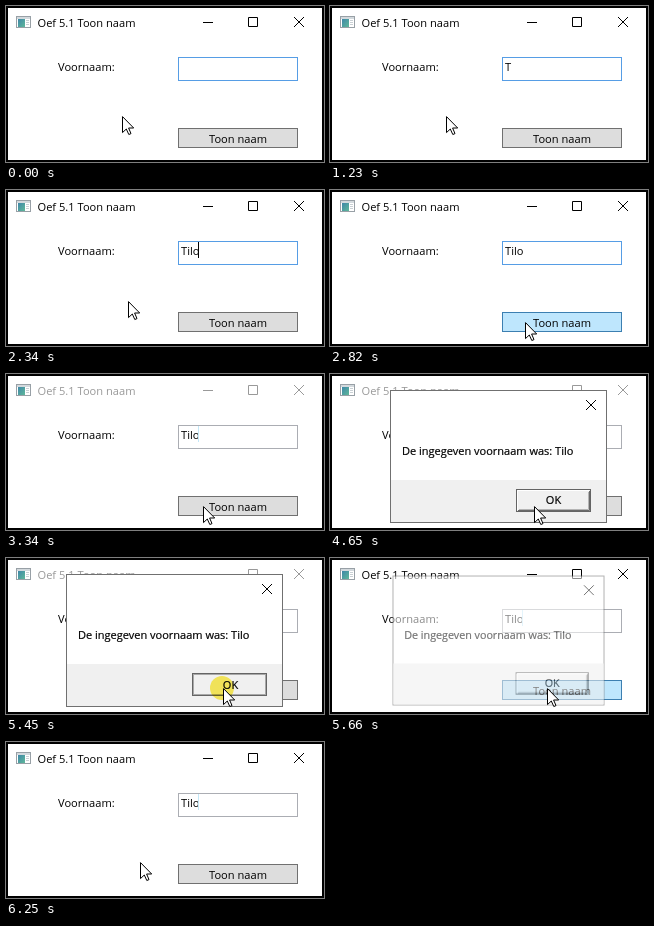
Recreate the animation shown at these times as an HTML page. Size 318x156 px, loop 7.82 s.

```html
<!DOCTYPE html>
<html lang="nl">
<head>
<meta charset="utf-8">
<title>Toon naam</title>
<style>
  html, body { margin: 0; width: 100%; height: 100%; overflow: hidden; background: #000; }
  svg { display: block; width: 100vw; height: 100vh; }
  text { font: 11.1px "Open Sans", "Noto Sans", sans-serif; fill: #000; }
  .line { fill: none; stroke: #000; }
  .inactive text { fill: #999; }
  .inactive .line { stroke: #999; }
  #field { fill: #fff; stroke: #abadb3; }
  #field.focus { stroke: #569de5; }
  #button { fill: #ddd; stroke: #707070; }
  #button.hover { fill: #bee6fd; stroke: #3c7fb1; }
  #button.pressed { fill: #c4e5f6; stroke: #2c628b; }
  #caret.on { fill: #000; }
  #caret.ghost { fill: #c4e8f8; }
  #caret.off { fill: none; }
  #dialog text { font-size: 11px; stroke: #000; stroke-width: .2px; }
  #halo { fill: #fff04c; mix-blend-mode: multiply; opacity: .9; }
</style>
</head>
<body>
<svg viewBox="0 0 318 156">
  <defs>
    <linearGradient id="teal" x2="1" y2="1">
      <stop stop-color="#3f87a8"/><stop offset="1" stop-color="#5fb89a"/>
    </linearGradient>
  </defs>
  <rect width="318" height="156"/>
  <rect x="2" y="2" width="314" height="152" fill="#fff"/>

  <g id="titlebar">
    <rect x="10.5" y="10.5" width="14" height="11" fill="#fff" stroke="#98a0a6"/>
    <rect x="11" y="11" width="13" height="2" fill="#d3d9dd"/>
    <rect x="12" y="13" width="7" height="8" fill="url(#teal)"/>
    <path d="M20 14.5h3M20 16.5h3M20 18.5h3" stroke="#c9d0d4"/>
    <text x="31.5" y="20.5">Oef 5.1 Toon naam</text>
    <path class="line" d="M197 16.5h10M242.5 11.5h9v9h-9zM288 11l10 10M298 11l-10 10"/>
  </g>

  <text x="52" y="65">Voornaam:</text>
  <rect id="field" x="172.5" y="51.5" width="119" height="23"/>
  <text id="value" x="175" y="65"></text>
  <rect id="caret" y="52" width="1" height="16"/>
  <rect id="button" x="172.5" y="122.5" width="119" height="19"/>
  <text x="232" y="137" text-anchor="middle">Toon naam</text>

  <g id="dialog">
    <rect x="60.5" y="16.5" width="216" height="132" fill="#fff" stroke="#707070"/>
    <rect x="61" y="106" width="215" height="42" fill="#f0f0f0"/>
    <path class="line" d="M256 26l10 10M266 26l-10 10"/>
    <text x="72" y="81">De ingegeven voornaam was: Tilo</text>
    <rect x="186.5" y="115.5" width="74" height="22" fill="#f0f0f0" stroke="#646464"/>
    <g id="raised">
      <path class="line" d="M187.5 136V116.5H259" style="stroke:#fff"/>
      <path class="line" d="M188 136.5H259.5V117" style="stroke:#696969"/>
      <path class="line" d="M189 135.5H258.5V118" style="stroke:#b4b4b4"/>
    </g>
    <rect id="sunken" class="line" x="187.5" y="116.5" width="72" height="20" style="stroke:#a8a8a8"/>
    <text id="ok" y="130" text-anchor="middle">OK</text>
  </g>

  <circle id="halo" r="12"/>
  <path id="pointer" d="M.5 .6V16.6L4.3 13 6.8 18.5 9 17.6 6.6 12H11.7Z" fill="#fff" stroke="#000"/>
</svg>
<script>
const LOOP = 7820;
const $ = id => document.getElementById(id);

const initial = {
  x: 116, y: 110, value: '', caret: 'off', caretX: 175, field: 'focus',
  button: '', inactive: false, dialog: 0, scale: 1, okDown: false, halo: false
};

const at = (time, change) => ({ time, change });
const move = (time, x, y, more) => at(time, { x, y, ...more });
const type = (time, value, caretX, caret = 'on') => at(time, { value, caretX, caret });

// Each step keeps what the earlier ones have set.
const steps = [
  at(70, { caret: 'on' }),
  at(610, { caret: 'off' }),
  at(1070, { caret: 'on' }),
  type(1230, 'T', 181, 'off'),
  type(1310, 'T', 181),
  type(1550, 'Ti', 183),
  type(1710, 'Til', 186),
  type(1790, 'Tilo', 192),

  move(2340, 122, 111),
  move(2400, 131, 113, { caret: 'off' }),
  move(2480, 145, 117),
  move(2560, 161, 122),
  move(2640, 176, 127, { button: 'hover' }),
  move(2720, 188, 130),
  move(2800, 195, 132),
  move(2900, 197, 132, { caret: 'on' }),

  at(3140, { button: 'pressed', halo: true, field: '', caret: 'ghost' }),
  at(3240, { button: 'hover', halo: false }),
  at(3340, { button: '', inactive: true }),
  at(3390, { dialog: .35, scale: .95 }),
  at(3470, { dialog: .7, scale: .98 }),
  at(3550, { dialog: .92, scale: .995 }),
  at(3640, { dialog: 1, scale: 1 }),

  move(4570, 199, 132),
  move(4650, 204, 132),
  move(4730, 209, 131),
  move(4810, 213, 131),
  move(4890, 216, 130),
  move(4960, 217, 130),

  at(5450, { okDown: true, halo: true }),
  at(5580, { okDown: false, halo: false }),
  at(5660, { dialog: .55, scale: .977, inactive: false, button: 'hover' }),
  at(5750, { dialog: 0 }),
  move(5840, 210, 129),
  move(5930, 190, 127),
  move(6010, 165, 124, { button: '' }),
  move(6100, 144, 121),
  move(6190, 135, 120),
  move(6250, 134, 120)
];

function stateAt(time) {
  const state = { ...initial };
  for (const step of steps) {
    if (step.time > time) break;
    Object.assign(state, step.change);
  }
  return state;
}

const show = (id, visible) => $(id).setAttribute('visibility', visible ? 'inherit' : 'hidden');

function draw(s) {
  $('titlebar').setAttribute('class', s.inactive ? 'inactive' : '');
  $('field').setAttribute('class', s.field);
  $('button').setAttribute('class', s.button);
  $('caret').setAttribute('class', s.caret);
  $('caret').setAttribute('x', s.caretX);
  $('value').textContent = s.value;

  show('dialog', s.dialog > 0);
  $('dialog').setAttribute('opacity', s.dialog);
  $('dialog').setAttribute('transform', `translate(168.5 82.5) scale(${s.scale}) translate(-168.5 -82.5)`);
  show('raised', !s.okDown);
  show('sunken', s.okDown);
  $('ok').setAttribute('x', s.okDown ? 224.5 : 223.5);
  $('ok').setAttribute('y', s.okDown ? 131 : 130);

  show('halo', s.halo);
  $('halo').setAttribute('cx', s.x - 1);
  $('halo').setAttribute('cy', s.y);
  $('pointer').setAttribute('transform', `translate(${s.x} ${s.y})`);
}

const start = performance.now();
function tick() {
  draw(stateAt((performance.now() - start) % LOOP));
  requestAnimationFrame(tick);
}
tick();
</script>
</body>
</html>
```
